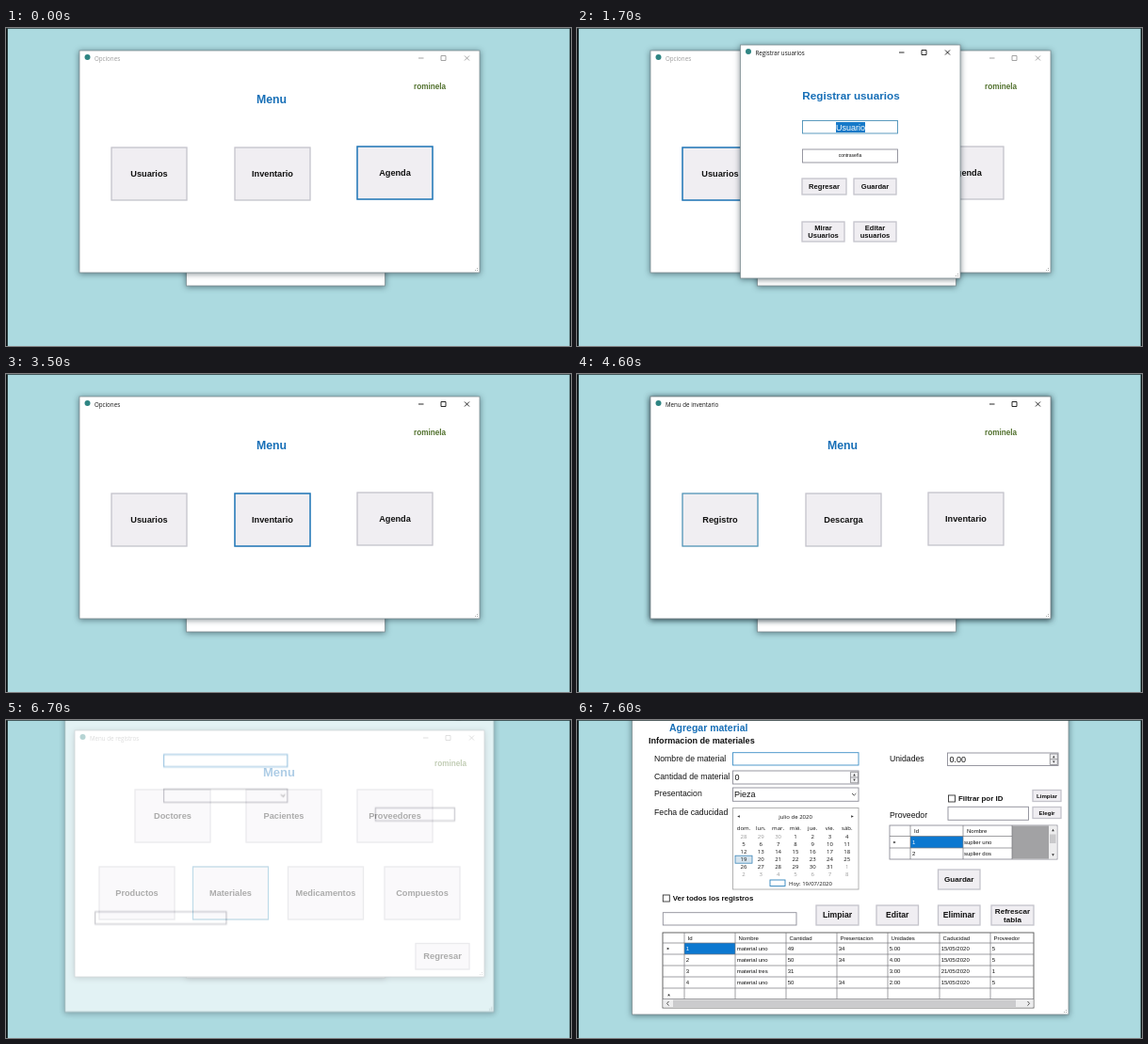
An HTML page that plays this animation: 600x338 px, repeating every 8 s.

```html
<!DOCTYPE html>
<html lang="es">
<head>
<meta charset="utf-8">
<title>Menu</title>
<style>
html, body { margin: 0; width: 100%; height: 100%; overflow: hidden; background: #acdae0; }
svg { display: block; width: 100vw; height: 100vh; }
text { font-family: "Liberation Sans", Arial, sans-serif; fill: #111; }
text.ui { font-family: "Open Sans", "Noto Sans", sans-serif; }
text.b { font-weight: bold; }
.frame { fill: #fff; stroke: #7f8f94; stroke-width: .8; filter: drop-shadow(0 1px 3px rgba(0, 20, 30, .5)); }
.bar { color: #111; }
.bar text { fill: currentColor; }
.bar path { fill: none; stroke: currentColor; stroke-width: .9; }
.btn { fill: #f0eef2; stroke: #c4c3cb; stroke-width: 1.3; }
.field { fill: #fff; stroke: #8d8d98; stroke-width: .9; }
.thick { fill: none; stroke: #1a78bd; stroke-width: 1.4; }
.thin { fill: none; stroke: #3f96bf; stroke-width: 1; }
.line { fill: none; stroke: #77777c; stroke-width: .7; }
.glyph { fill: none; stroke: #444; stroke-width: .9; }
</style>
</head>
<body>
<svg id="stage" viewBox="0 0 600 338"></svg>
<script>
const LOOP = 8000, USER = "rominela";
const BLUE = "#176fb7", GREEN = "#50702c";
const css = [];

// Stops are [milliseconds, declarations].
function animate(id, timing, stops) {
  const body = stops.map(([ms, rule]) => `${ms / LOOP * 100}%{${rule}}`).join("");
  css.push(`@keyframes ${id}{${body}}#${id}{animation:${id} ${LOOP}ms ${timing} infinite}`);
}
const show = (id, from, to = LOOP) => animate(id, "step-end", [
  ...(from ? [[0, "opacity:0"]] : []), [from, "opacity:1"], ...(to < LOOP ? [[to, "opacity:0"]] : [])]);
const pose = (opacity, scale) => `opacity:${opacity};transform:scale(${scale})`;
const tint = (id, stops) => animate(id, "step-end", stops.map(([ms, on]) => [ms, `color:${on ? "#111" : "#9a9a9a"}`]));

const rect = (cls, l, t, r, b, extra = "") =>
  `<rect class="${cls}" x="${l}" y="${t}" width="${r - l}" height="${b - t}" ${extra}/>`;
const fill = (color, l, t, r, b) => rect("", l, t, r, b, `fill="${color}"`);
const path = (cls, d) => `<path class="${cls}" d="${d}"/>`;
const text = (s, x, y, size, { cls = "", color = "", mid = false } = {}) =>
  `<text class="${cls}" x="${x}" y="${y}" font-size="${size}" ${mid ? 'text-anchor="middle"' : ""} ` +
  `${color ? `style="fill:${color}"` : ""}>${s}</text>`;
const bold = (s, x, y, size, color) => text(s, x, y, size, { cls: "b", color });
const boldMid = (s, x, y, size, color) => text(s, x, y, size, { cls: "b", color, mid: true });
const group = (id, body) => `<g id="${id}">${body}</g>`;

function button(label, l, t, w, h, size = 9.2) {
  const lines = label.split("|"), step = size * 1.05;
  const top = t + h / 2 + size * .34 - (lines.length - 1) * step / 2;
  return rect("btn", l, t, l + w, t + h) +
    lines.map((s, i) => boldMid(s, l + w / 2, top + i * step, size)).join("");
}
const big = (label, l, t) => button(label, l, t, 80, 56);
const ring = (id, cls, l, t) => rect(cls, l, t, l + 80, t + 56, `id="${id}"`);

function win(id, title, l, t, r, b, body) {
  const y = t + 8;
  const grip = [[2, 2], [4, 2], [2, 4]].map(([dx, dy]) => fill("#aaa", r - dx - 1, b - dy - 1, r - dx, b - dy)).join("");
  css.push(`#${id}{transform-origin:${(l + r) / 2}px ${(t + b) / 2}px}`);
  return group(id, rect("frame", l, t, r, b) +
    `<g class="bar" id="${id}Bar"><circle cx="${l + 8.5}" cy="${y - 1}" r="3" fill="#2f8583"/>` +
    text(title, l + 16, y + 2.7, 6.2, { cls: "ui" }) +
    path("", `M${r - 65} ${y}h5.5M${r - 41} ${y - 2.5}h5v5h-5zM${r - 16} ${y - 2.5}l5 5m0-5l-5 5`) +
    "</g>" + grip + body);
}

const menuWindow = (id, title, labels, rings) => win(id, title, 78, 24, 503, 260,
  boldMid("Menu", 282, 79.5, 12.3, BLUE) + bold(USER, 433, 64.5, 8.2, GREEN) +
  big(labels[0], 112, 127) + big(labels[1], 243, 127) + big(labels[2], 373, 126) + rings);

const options = menuWindow("options", "Opciones", ["Usuarios", "Inventario", "Agenda"],
  ring("agendaFocus", "thick", 373, 126) + ring("usersHover", "thin", 112, 127) +
  ring("usersFocus", "thick", 112, 127) + ring("stockFocus", "thick", 243, 127));

const signup = win("signup", "Registrar usuarios", 173.5, 18, 407, 266,
  rect("field", 239.5, 98.5, 340.5, 112, 'style="stroke:#4a90b8"') + fill("#1679c8", 275, 100, 306, 111) +
  text("Usuario", 290.5, 108.8, 9, { mid: true, color: "#fff" }) +
  rect("field", 239.5, 129, 340.5, 143) +
  group("signupRest",
    boldMid("Registrar usuarios", 291, 76, 11.7, BLUE) +
    text("contraseña", 290, 137, 5, { mid: true }) +
    button("Regresar", 239, 160, 47, 17, 7.6) + button("Guardar", 294, 160, 45, 17, 7.6) +
    button("Mirar|Usuarios", 239, 206, 45, 21, 7.6) + button("Editar|usuarios", 294, 206, 45, 21, 7.6)));

const stock = menuWindow("stock", "Menu de inventario", ["Registro", "Descarga", "Inventario"],
  ring("listFocus", "thick", 373, 126) + ring("recordHover", "thin", 112, 127));

const records = win("records", "Menu de registros", 73, 11, 508, 273,
  boldMid("Menu", 290, 60, 13, BLUE) + bold(USER, 455, 49.3, 8.2, GREEN) +
  big("Doctores", 137, 74) + big("Pacientes", 255, 74) + big("Proveedores", 373, 74) +
  big("Productos", 99, 156) + big("Materiales", 198.5, 156) +
  big("Medicamentos", 299.5, 156) + big("Compuestos", 402, 156) +
  button("Regresar", 435, 237.5, 57, 27.5, 9.4) +
  ring("vendorFocus", "thick", 373, 74) + ring("drugHover", "thin", 299.5, 156) +
  ring("materialHover", "thin", 198.5, 156));

const arrow = (x, y, dx, dy) => `<path fill="#333" d="M${x + dx} ${y + dy}L${x - dx - dy} ${y - dy - dx}L${x - dx + dy} ${y - dy + dx}z"/>`;
const spinner = (x, t) => fill("#eeeef0", x - 4, t + 1, x + 4, t + 12.5) +
  path("line", `M${x - 4} ${t + 6.7}h8M${x - 4} ${t + 1}v11.5h8v-11.5z`) +
  arrow(x, t + 4, 0, -1.2) + arrow(x, t + 9.6, 0, 1.2);
const check = (label, x, y) => rect("field", x, y, x + 7, y + 7, 'style="stroke:#333"') + bold(label, x + 10.5, y + 6.3, 7.9);

function calendar() {
  const small = (s, x, y, color) => text(s, x, y, 6, { cls: "ui", mid: true, color });
  const col = i => 177 + i * 18.3;
  let out = rect("field", 165.5, 93.5, 299, 180, 'style="stroke:#aaa"') +
    small("julio de 2020", 232, 105.3) + arrow(171.5, 102.5, -1.3, 0) + arrow(292.5, 102.5, 1.3, 0) +
    rect("", 168, 144.2, 186, 152.2, 'fill="#d6e4ee" stroke="#3c86b8" stroke-width=".8"');
  ["dom.", "lun.", "mar.", "mié.", "jue.", "vie.", "sáb."].forEach((d, i) => out += small(d, col(i), 116.8));
  for (let i = 0; i < 42; i++) {
    const day = i - 2, inside = day > 0 && day < 32;
    const label = day < 1 ? day + 30 : inside ? day : day - 31;
    out += small(label, col(i % 7), 125.8 + Math.floor(i / 7) * 8.1, inside ? "" : "#999");
  }
  return out + rect("field", 205, 170, 221, 176.5, 'style="stroke:#2f84bd"') + small("Hoy: 19/07/2020", 248, 175.6);
}

const cell = (s, x, y, color) => text(s, x, y, 6, { color });

function suppliers() {
  return rect("field", 332, 112, 510, 148) + fill("#a2a2a4", 462, 112.5, 501, 147.5) +
    fill("#ededee", 501, 112.5, 509.5, 147.5) + fill("#c9c9cb", 502, 121.5, 508.5, 131) +
    arrow(505.5, 117, 0, -1.3) + arrow(505.5, 143.5, 0, 1.3) +
    fill("#0c78d0", 354, 123.5, 410, 136) +
    path("line", "M332 123.5H462M332 136H462M354 112V148M410 112V148M462 112V148") + arrow(337.5, 130, 1.3, 0) +
    cell("Id", 358, 120) + cell("Nombre", 414, 120) +
    cell("1", 356, 132, "#fff") + cell("suplier uno", 411, 132) + cell("2", 356, 144.3) + cell("suplier dos", 411, 144.3);
}

function materials() {
  const columns = [114, 168, 222, 276, 330, 385, 439];
  const rows = ["1,material uno,49,34,5.00,15/05/2020,5", "2,material uno,50,34,4.00,15/05/2020,5",
    "3,material tres,31,,3.00,21/05/2020,1", "4,material uno,50,34,2.00,15/05/2020,5"];
  let out = rect("field", 91, 226, 485, 306, 'style="stroke:#555"') + fill("#0c78d0", 114, 237, 168, 249) +
    path("line", columns.map(x => `M${x} 226V296.5`).join("") +
      [237, 249, 261, 273, 285, 296.5].map(y => `M91 ${y}H485`).join(""));
  "Id,Nombre,Cantidad,Presentacion,Unidades,Caducidad,Proveedor".split(",")
    .forEach((s, i) => out += cell(s, columns[i] + 3.5, 233.8));
  rows.forEach((row, r) => row.split(",").forEach((s, i) =>
    out += cell(s, columns[i] + 1.7, 245.2 + r * 12, r + i ? "" : "#fff")));
  return out + arrow(97, 243, 1.3, 0) + text("*", 96, 295.5, 8) +
    fill("#ededee", 91.5, 297, 484.5, 305.5) + fill("#cbcbcd", 102, 297.5, 466, 305) +
    path("glyph", "M97.5 299l-2 2.3 2 2.3M478.5 299l2 2.3-2 2.3");
}

const label = (s, x, y) => text(s, x, y, 8.7);
const form = win("form", "Materiales", 58.5, -14, 522, 313,
  rect("field", 165.5, 34.7, 299, 48, 'style="stroke:#3d8ec6"') + rect("field", 165.5, 72, 299, 86.3) +
  path("glyph", "M292 78l2.2 2.2 2.2-2.2") + rect("field", 394, 92.3, 479.5, 106.3) + rect("field", 91.3, 204.7, 233, 218) +
  group("formRest",
    bold("Agregar material", 98, 11.7, 10.5, BLUE) + bold("Informacion de materiales", 76, 25.3, 9.1) +
    label("Nombre de material", 82, 43.5) + label("Cantidad de material", 82, 62.5) +
    label("Presentacion", 82, 81) + label("Fecha de caducidad", 82, 101) +
    label("Unidades", 332, 43.7) + label("Proveedor", 332, 103.8) +
    rect("field", 165.5, 54, 299, 68) + text("0", 167.5, 64.3, 9) + spinner(294.5, 54.3) +
    text("Pieza", 167, 82.3, 9) + rect("field", 393.5, 35, 511, 48.5) + text("0.00", 395.5, 45, 9) + spinner(506.3, 35) +
    check("Filtrar por ID", 394.5, 80) + check("Ver todos los registros", 91.3, 186) +
    button("Limpiar", 484, 74.5, 30, 12, 6.1) + button("Elegir", 484, 92.5, 30, 12, 6.1) +
    button("Guardar", 383.5, 159, 44.5, 21, 8.1) + button("Limpiar", 254, 197, 45, 21, 8.6) +
    button("Editar", 318, 197, 44.5, 21, 8.6) + button("Eliminar", 383.5, 197, 44.5, 21, 8.6) +
    button("Refrescar|tabla", 440, 197, 45, 21, 8.1) + calendar()) +
  group("formGrids", suppliers() + materials()));

const opening = (id, from, to) => animate(id, "linear", [
  [0, pose(0, .93)], [from, pose(0, .93)], [(from + to) / 2, pose(.65, .983)], [to, pose(1, 1)], [LOOP, pose(1, 1)]]);

animate("signup", "linear", [
  [0, pose(0, .93)], [900, pose(0, .93)], [1000, pose(.65, .983)], [1090, pose(1, 1)],
  [2420, pose(1, 1)], [2500, pose(.12, .967)], [2560, pose(0, .95)], [LOOP, pose(0, .95)]]);
opening("stock", 3700, 3900);
opening("records", 4700, 4900);
opening("form", 6610, 6790);

tint("optionsBar", [[0, 0], [150, 1], [880, 0], [2440, 1], [3700, 0]]);
tint("stockBar", [[0, 1], [4680, 0]]);
tint("recordsBar", [[0, 1], [6050, 0]]);

show("agendaFocus", 0, 850);
show("usersHover", 800, 1500);
show("usersFocus", 1500, 3000);
show("stockFocus", 3000);
show("signupRest", 1180);
show("listFocus", 0, 4500);
show("recordHover", 4350);
show("vendorFocus", 0, 5950);
show("drugHover", 5450, 5680);
show("materialHover", 5680);
show("formRest", 6880);
show("formGrids", 7080);

document.getElementById("stage").innerHTML =
  fill("#acdae0", 0, 0, 600, 338) + rect("frame", 191.5, 100, 402.5, 274) +
  options + signup + stock + records + form +
  fill("#0b1416", 0, 0, 1.8, 338) + fill("#0b1416", 598.6, 0, 600, 338) + fill("#2b3a3d", 0, 0, 600, .8);
document.head.appendChild(document.createElement("style")).textContent = css.join("\n");
</script>
</body>
</html>
```
